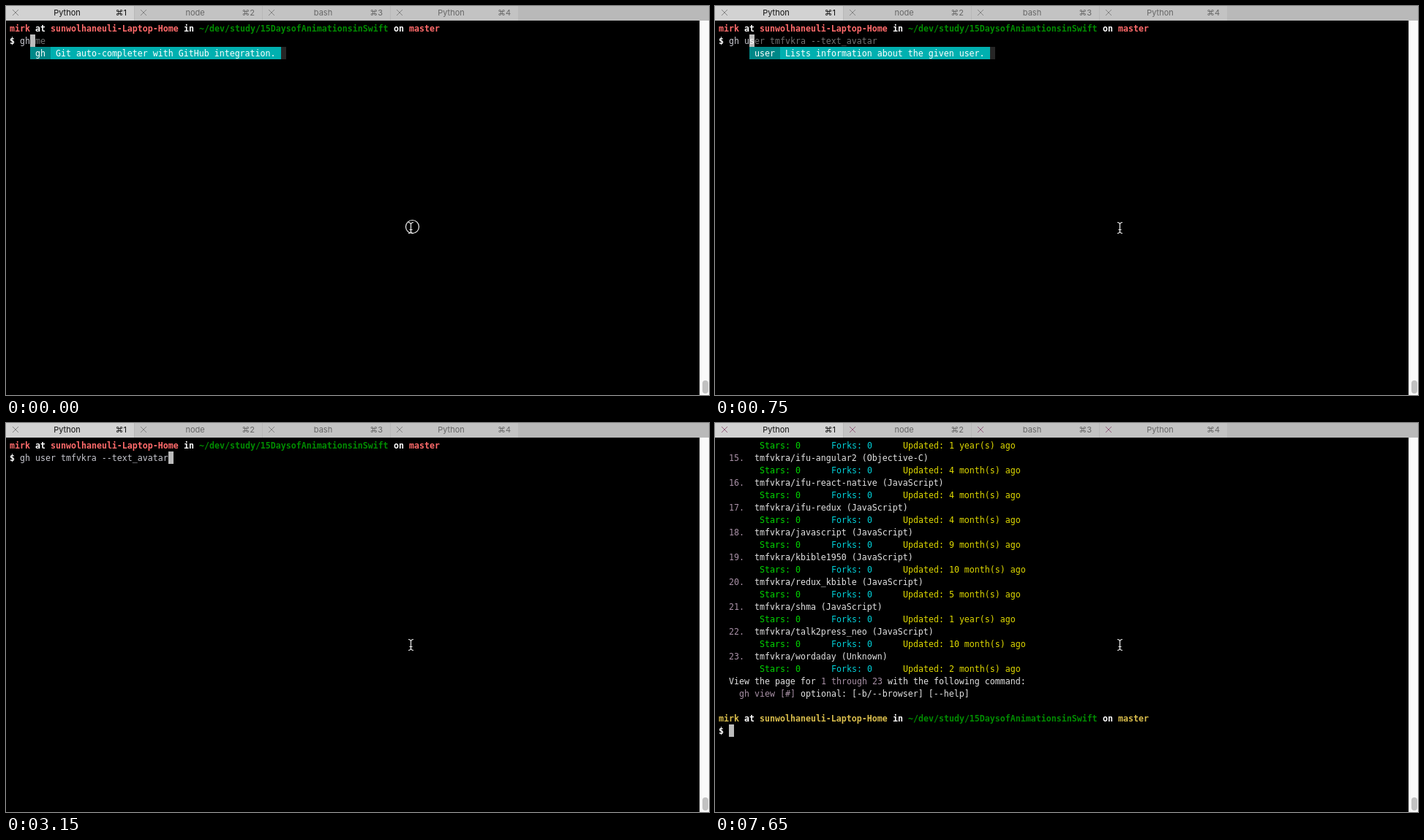
These frames come from a looping animation (961x533 px, 8 s). An HTML page with a canvas:

```html
<!DOCTYPE html>
<html>
<head>
<meta charset="utf-8">
<style>
html, body { margin: 0; width: 100%; height: 100%; overflow: hidden; background: #000; }
canvas { display: block; }
</style>
</head>
<body>
<canvas id="stage" width="961" height="533"></canvas>
<script>
const g = document.getElementById('stage').getContext('2d');
const LOOP = 8000, CW = 7, RH = 17;
const MONO = '11.627px "DejaVu Sans Mono", monospace';
const UI = '11px Inter, "DejaVu Sans", sans-serif';
const USER = 'tmfvkra';
const COMMAND = `gh user ${USER} --text_avatar`;
const X = col => 5 + col * CW, Y = row => 22 + row * RH;

const MENU = `configure|Configures gitsome.
create-comment|Creates a comment on the given issue.
create-issue|Creates an issue.
create-repo|Creates a repository.
emails|Lists all the user's registered emails.
emojis|Lists all GitHub supported emojis.
feed|Lists all activity for the given user or repo, if called with no arg, shows the logged in user's feed.
followers|Lists all followers and the total follower count.
following|Lists all followed users and the total followed count.
gitignore-template|Outputs the gitignore template for the given language.
gitignore-templates|Outputs all supported gitignore templates.
issue|Outputs detailed information about the given issue.
issues|Lists all issues matching the filter.
license|Outputs the license template for the given license.
licenses|Outputs all supported license templates.
me|Lists information about the logged in user.`.split('\n').map(s => s.split('|'));
const GH = [['gh', 'Git auto-completer with GitHub integration.']];
const USERS = [['user', 'Lists information about the given user.']];

const REPOS = `${USER}.github.io (CSS)|1 month
es6_study (JavaScript)|9 month
focus-on (CSS)|3 week
heroku-buildpack-nodejs-phantomjs (Shell)|1 year
ifu-angular2 (Objective-C)|4 month
ifu-react-native (JavaScript)|4 month
ifu-redux (JavaScript)|4 month
javascript (JavaScript)|9 month
kbible1950 (JavaScript)|10 month
redux_kbible (JavaScript)|5 month
shma (JavaScript)|1 year
talk2press_neo (JavaScript)|10 month
wordaday (Unknown)|2 month`.split('\n').map(s => s.split('|'));

const FADED = { text: '#ecedd2', num: '#c4c4b0', dim: '#a09c86', stars: '#00d000', forks: '#00bcaa', date: '#cccb6c' };
const CLEAR = { text: '#e4e4e4', num: '#a890a6', dim: '#a890a6', stars: '#00d400', forks: '#00d0d8', date: '#e0da00' };

// Each step: start time and what the terminal shows from then on
const STEPS = [
  { at: 0, typed: 'gh', hint: ' me', menu: GH, click: true },
  { at: 150, typed: 'gh ', hint: 'me' },
  { at: 300, typed: 'gh ', hint: 'me', menu: MENU, thumb: '#144614', accent: '#ee6060' },
  { at: 750, typed: 'gh u', menu: USERS },
  { at: 900, typed: 'gh us', menu: USERS },
  { at: 1350, typed: 'gh use', menu: USERS },
  { at: 2250, typed: 'gh user', menu: USERS, left: '#00a0a0' },
  { at: 3150, typed: COMMAND },
  { at: 3750, typed: COMMAND, sent: true },
  { at: 7500, list: FADED, scroll: 0, cross: '#b9ad55' },
  { at: 7650, list: CLEAR, scroll: 7, cross: '#95607e' }
];

function rect(x, y, w, h, color) {
  g.fillStyle = color;
  g.fillRect(x, y, w, h);
}

function put(col, row, text, color, bold) {
  g.font = (bold ? 'bold ' : '') + MONO;
  g.textAlign = 'left';
  g.fillStyle = color;
  g.fillText(text, X(col), Y(row) + 13);
  return col + text.length;
}

function cursor(col, row) {
  rect(X(col), Y(row), CW, RH, '#bcbcbc');
}

function prompt(row, accent) {
  const parts = [['mirk', accent], [' at ', '#fff'], ['sunwolhaneuli-Laptop-Home', accent], [' in ', '#fff'],
    ['~/dev/study/15DaysofAnimationsinSwift', '#008c00'], [' on ', '#fff'], ['master', accent]];
  let col = 0;
  for (const [text, color] of parts) col = put(col, row, text, color, true);
  put(0, row + 1, '$', '#fff', true);
}

function popup(col, { menu, left = '#008888', thumb = '#262626' }) {
  const width = i => Math.max(...menu.map(m => m[i].length)) + 2;
  const a = width(0), b = width(1), h = menu.length * RH;
  rect(X(col), Y(2), a * CW, h, left);
  rect(X(col + a), Y(2), (b + 1) * CW, h, '#00b0b0');
  rect(X(col + a + b), Y(2), CW, RH, thumb);
  menu.forEach(([name, about], i) => {
    put(col + 1, i + 2, name, '#fff');
    put(col + a + 1, i + 2, about, '#fff');
  });
}

function shell(s) {
  const end = 2 + s.typed.length;
  const hint = s.hint ?? COMMAND.slice(s.typed.length);
  if (s.menu) popup(end, s);
  if (s.sent) cursor(0, 2); else cursor(end, 1);
  prompt(0, s.accent || '#ff6b6b');
  put(2, 1, s.typed, s.sent ? '#dcdcdc' : '#c8c8d0');
  put(end, 1, hint[0] || '', '#fff');
  put(end + 1, 1, hint.slice(1), '#747474');
}

function listing({ list: c, scroll }) {
  REPOS.forEach(([repo, age], i) => {
    const row = i * 2 - scroll;
    if (row >= 0) {
      put(2, row, `${i + 11}.`, c.num);
      put(7, row, `${USER}/${repo}`, c.text);
    }
    put(8, row + 1, 'Stars: 0', c.stars);
    put(22, row + 1, 'Forks: 0', c.forks);
    put(36, row + 1, `Updated: ${age}(s) ago`, c.date);
  });
  const row = 26 - scroll;
  let col = put(2, row, 'View the page for ', c.text);
  col = put(col, row, '1 through 23', c.dim);
  put(col, row, ' with the following command:', c.text);
  put(4, row + 1, 'gh view [#]', c.dim);
  put(16, row + 1, 'optional: [-b/--browser] [--help]', c.text);
  if (scroll) {
    prompt(row + 3, '#d9bd4c');
    cursor(2, row + 4);
  } else cursor(0, 29);
}

function stroke(path, color, width) {
  g.strokeStyle = color;
  g.lineWidth = width;
  g.stroke(new Path2D(path));
}

function chrome(cross = '#858585') {
  rect(0, 0, 961, 20, '#b9b9b9');
  ['Python', 'node', 'bash', 'Python'].forEach((name, i) => {
    const x = i * 175;
    rect(x, 0, 175, 20, i ? '#c3c3c3' : '#d2d2d2');
    if (i) rect(x, 0, 1, 20, '#b8b8b8');
    stroke(`M${x + 9} 5l8 8m0-8l-8 8`, cross, 1);
    g.font = UI;
    g.fillStyle = i ? '#666' : '#111';
    g.textAlign = 'center';
    g.fillText(name, x + 83.5, 13);
    g.textAlign = 'right';
    g.fillText('⌘' + (i + 1), x + 165, 13);
  });
  rect(948, 20, 13, 513, '#fafafa');
  rect(948, 20, 1, 513, '#e8e8e8');
  g.fillStyle = '#c1c1c1';
  g.beginPath();
  g.roundRect(952, 513, 8, 18, 4);
  g.fill();
}

function pointer(s) {
  const beam = 'M550 296.5q3 0 3.5 2.5q.5-2.5 3.5-2.5M553.5 298v12M551.5 306.5h4M550 311.5q3 0 3.5-2.5q.5 2.5 3.5 2.5';
  if (s.menu === MENU) {
    stroke(beam, '#e8f4f4', 2.6);
    stroke(beam, '#111', 1.2);
  } else stroke(beam, '#f0f0f0', 1.2);
  if (s.click) {
    g.beginPath();
    g.arc(555.5, 302.5, 9, 0, Math.PI * 2);
    g.lineWidth = 1.2;
    g.stroke();
  }
}

function draw(now) {
  const t = now % LOOP;
  const s = STEPS.findLast(step => step.at <= t) || STEPS[0];
  rect(0, 0, 961, 533, '#000');
  if (s.list) listing(s); else shell(s);
  chrome(s.cross);
  pointer(s);
}

const start = performance.now();
function tick() {
  draw(performance.now() - start);
  requestAnimationFrame(tick);
}
tick();
</script>
</body>
</html>
```
